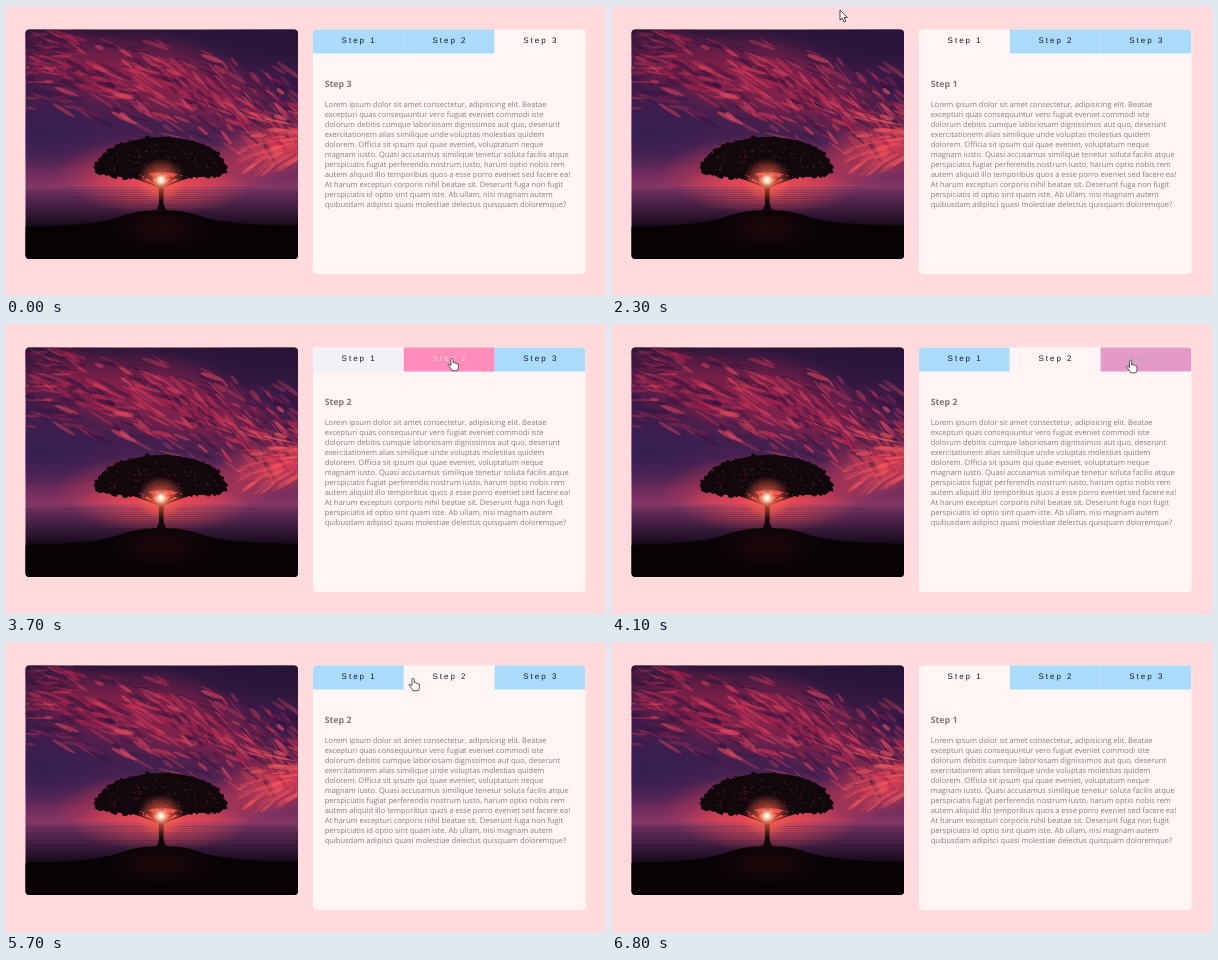
These frames come from a looping animation (600x290 px, 7500 ms). An HTML page with a canvas:

```html
<!DOCTYPE html>
<html lang="en">
<head>
<meta charset="utf-8">
<title>Step tabs</title>
<style>
html, body { margin: 0; width: 100%; height: 100%; overflow: hidden; }
body { position: relative; background: #ffdbdd; }
#stage, #cursor { position: absolute; left: 0; top: 0; }
#panel {
  position: absolute; left: 307px; top: 23px; width: 273px; height: 245px;
  color: #857d7d; text-rendering: geometricPrecision;
}
.tab {
  position: absolute; top: 0; width: 91px; text-align: center;
  font: 8px/24px "Liberation Sans", Arial, sans-serif; letter-spacing: 2px;
}
h1, p { position: absolute; left: 11.7px; margin: 0; white-space: pre; }
h1 { top: 49px; font: bold 8.8px/12px "Open Sans", sans-serif; color: #7f7777; }
p { top: 71px; font: 7.52px/10.03px "Open Sans", sans-serif; }
#cursor { overflow: visible; }
#cursor path { fill: #fff; stroke: #333; stroke-width: .9; stroke-linejoin: round; }
</style>
</head>
<body>
<canvas id="stage" width="600" height="290"></canvas>
<div id="panel">
  <div class="tab" style="left:.7px">Step 1</div>
  <div class="tab" style="left:91.5px">Step 2</div>
  <div class="tab" style="left:182.3px">Step 3</div>
  <h1>Step 3</h1>
  <p>Lorem ipsum dolor sit amet consectetur, adipisicing elit. Beatae
excepturi quas consequuntur vero fugiat eveniet commodi iste
dolorum debitis cumque laboriosam dignissimos aut quo, deserunt
exercitationem alias similique unde voluptas molestias quidem
dolorem. Officia sit ipsum qui quae eveniet, voluptatum neque
magnam iusto. Quasi accusamus similique tenetur soluta facilis atque
perspiciatis fugiat perferendis nostrum iusto, harum optio nobis rem
autem aliquid illo temporibus quos a esse porro eveniet sed facere ea!
At harum excepturi corporis nihil beatae sit. Deserunt fuga non fugit
perspiciatis id optio sint quam iste. Ab ullam, nisi magnam autem
quibusdam adipisci quasi molestiae delectus quisquam doloremque?</p>
</div>
<svg id="cursor" width="16" height="18">
  <path id="arrow" d="M0 0V10.2L2.3 8.1L4 12L5.8 11.2L4.1 7.5H7.3Z"/>
  <path id="hand" transform="translate(0 .6) scale(.92)" d="M-1.2 7.6V.9Q-1.1-.3 0-.3T1.2.9V4.6Q2.6 3.8 3.2 5Q4.5 4.3 5.2 5.6Q7 5.2 7 7V9.4Q7 11 5.8 13.2H0Q-1 11-2.6 9.2L-4.2 7.4Q-4.6 6-3.2 6.2Z"/>
</svg>
<script>
const LOOP = 7500, STEP = 100, FADE = 210;
const PAGE = '#ffdbdd', PANEL = '#fff5f4';
const $ = id => document.getElementById(id);
const c = $('stage').getContext('2d');
const mix = (a, b, k) => a + (b - a) * k;

const looks = {
  idle:   { bg: [170, 219, 251], ink: [25, 25, 35] },
  hover:  { bg: [255, 122, 176], ink: [255, 240, 245] },
  active: { bg: [255, 245, 244], ink: [25, 25, 35] }
};

// [time, look]; entries up to 1200 ms switch without a fade
const tabKeys = [
  [[0, 'idle'], [1200, 'active'], [3670, 'idle'], [5760, 'hover'], [6230, 'active']],
  [[0, 'idle'], [3250, 'hover'], [3670, 'active'], [4580, 'idle'],
   [5060, 'hover'], [5360, 'active'], [6230, 'idle']],
  [[0, 'active'], [1200, 'idle'], [3960, 'hover'], [4580, 'active'], [5360, 'idle']]
];
const titleKeys = [[0, 3], [1200, 1], [3670, 2], [4580, 3], [5360, 2], [6230, 1]];

const path = [
  [1900, 108, 174], [2100, 165, 95], [2300, 228, 4], [2450, 290, 12],
  [2600, 318, 50], [2700, 302, 66], [2900, 325, 76], [3100, 375, 52],
  [3250, 400, 38], [3500, 440, 35], [3700, 446, 34], [3800, 452, 35],
  [3960, 490, 36], [4200, 539, 36], [4800, 539, 36], [5060, 486, 36],
  [5360, 432, 37], [5700, 407, 36], [5760, 397, 36], [6100, 352, 37],
  [6800, 350, 36]
];

const lastIndex = (keys, t) => {
  let i = 0;
  while (i + 1 < keys.length && keys[i + 1][0] <= t) i++;
  return i;
};

function clipRound(x, y, w, h) {
  c.beginPath();
  c.roundRect(x, y, w, h, 4);
  c.clip();
}

function drawPanel(t) {
  c.fillStyle = PAGE;
  c.fillRect(300, 15, 300, 265);
  c.save();
  clipRound(307, 23.5, 272.5, 244.5);
  c.fillStyle = PANEL;
  c.fillRect(300, 15, 300, 265);
  tabs.forEach((el, n) => {
    const keys = tabKeys[n], i = lastIndex(keys, t);
    const [start, name] = keys[i];
    const to = looks[name], from = i ? looks[keys[i - 1][1]] : to;
    const k = start <= 1200 ? 1 : Math.min(1, (t - start) / FADE);
    const blend = part => `rgb(${from[part].map((v, j) => Math.round(mix(v, to[part][j], k)))})`;
    c.fillStyle = blend('bg');
    c.fillRect(307 + n * 90.8, 20, 90.8, 27.5);
    el.style.color = blend('ink');
  });
  c.restore();
  title.textContent = 'Step ' + titleKeys[lastIndex(titleKeys, t)][1];
}

function moveCursor(t) {
  const shown = t >= 1900 && t < 6800;
  $('cursor').style.display = shown ? 'block' : 'none';
  if (!shown) return;
  const i = lastIndex(path, t), a = path[i], b = path[i + 1];
  const k = (t - a[0]) / (b[0] - a[0]);
  const x = mix(a[1], b[1], k), y = mix(a[2], b[2], k);
  const onTab = x > 307 && y > 23 && y < 48;
  $('hand').style.display = onTab ? 'block' : 'none';
  $('arrow').style.display = onTab ? 'none' : 'block';
  $('cursor').style.transform = `translate(${x}px, ${y}px)`;
}

function drawPhoto() {
  let seed = 7;
  const rnd = () => (seed = seed * 16807 % 2147483647) / 2147483647;
  const fade = (g, stops) => {
    stops.forEach(([at, color]) => g.addColorStop(at, color));
    return g;
  };
  const rect = (y, h, stops) => {
    c.fillStyle = fade(c.createLinearGradient(0, y, 0, y + h), stops);
    c.fillRect(19, y, 274, h);
  };
  const blob = (x, y, rx, ry, angle, color) => {
    c.fillStyle = color;
    c.beginPath();
    c.ellipse(x, y, rx, ry, angle, 0, 7);
    c.fill();
  };
  const glow = (x, y, rx, ry, rgb, alpha, angle = 0) => {
    c.save();
    c.translate(x, y);
    c.rotate(angle);
    c.scale(rx, ry);
    c.fillStyle = fade(c.createRadialGradient(0, 0, 0, 0, 0, 1), [
      [0, `rgba(${rgb},${alpha})`], [.5, `rgba(${rgb},${alpha * .55})`], [1, `rgba(${rgb},0)`]
    ]);
    c.fillRect(-1, -1, 2, 2);
    c.restore();
  };
  c.save();
  clipRound(19.5, 23.5, 272.5, 229.5);

  // sky
  rect(23, 158, [[0, '#28153a'], [.3, '#3c1a48'], [.65, '#44204f'],
                 [.85, '#5f2758'], [1, '#853565']]);
  glow(35, 130, 85, 36, '44,30,82', .7);
  glow(90, 65, 110, 42, '165,36,74', .7, .35);
  glow(185, 80, 110, 45, '170,38,76', .75, .4);
  glow(275, 140, 70, 32, '232,66,84', .9, -.2);

  // clouds
  c.filter = 'blur(.7px)';
  for (let i = 0; i < 420; i++) {
    const u = rnd(), x = 20 + 275 * u;
    const y = 55 + 55 * u + (rnd() + rnd() - 1) * 50;
    const angle = .2 + .6 * u + .6 * (rnd() - .5), len = 4 + 11 * rnd(), wide = .7 + 1.8 * rnd();
    const dark = i % 3 === 0, shade = rnd();
    const rgb = dark ? '52,20,62' : [165 + 75 * shade, 32 + 48 * shade, 75 + 25 * shade].map(Math.round);
    blob(x, y, len, wide, angle, `rgba(${rgb},${.25 + .35 * rnd()})`);
  }
  for (let i = 0; i < 45; i++) {
    const x = 235 + 60 * rnd(), y = 105 + 60 * rnd();
    blob(x, y, 6 + 10 * rnd(), .8 + 1.5 * rnd(), .4 - 1.1 * (y - 105) / 60,
         `rgba(250,90,95,${.2 + .35 * rnd()})`);
  }
  c.filter = 'none';
  glow(275, 30, 80, 38, '38,20,55', .9);
  glow(22, 24, 40, 22, '38,20,55', .8);
  glow(155, 172, 110, 42, '235,62,80', .9);

  // sea
  rect(180.5, 73, [[0, '#813866'], [.15, '#602a56'], [.35, '#3a1a3c'], [.52, '#1a0b1d'], [.6, '#070307']]);
  glow(155, 183, 90, 26, '245,80,85', .8);
  for (let y = 184; y < 218; y += 2) {
    c.fillStyle = `rgba(30,12,36,${.1 + .2 * rnd()})`;
    c.fillRect(19, y, 274, 1);
  }

  // hill
  c.fillStyle = '#070305';
  c.beginPath();
  c.moveTo(19, 221);
  c.quadraticCurveTo(92, 220, 116, 210);
  c.bezierCurveTo(138, 202, 174, 202, 194, 210);
  c.quadraticCurveTo(218, 219, 293, 220);
  c.lineTo(293, 254);
  c.lineTo(19, 254);
  c.fill();
  glow(155, 222, 55, 22, '60,12,18', .45);

  // tree
  const bark = '#11070d';
  c.fillStyle = bark;
  c.beginPath();
  c.moveTo(91, 166);
  c.bezierCurveTo(90, 146, 122, 131, 156, 131);
  c.bezierCurveTo(192, 131, 221, 146, 219, 167);
  c.quadraticCurveTo(196, 174, 174, 169);
  c.quadraticCurveTo(156, 163, 138, 169);
  c.quadraticCurveTo(112, 174, 91, 166);
  c.fill();
  for (let i = 0; i < 110; i++) {
    const a = i / 110 * Math.PI * 2, s = Math.sin(a);
    blob(155 + 64 * Math.cos(a), 162 + s * (s < 0 ? 30 : 8) + 3 * rnd(),
         1 + 2.8 * rnd(), .8 + 1.8 * rnd(), rnd(), bark);
  }
  for (let i = 0; i < 90; i++) {
    const a = rnd() * Math.PI, r = Math.sqrt(rnd());
    blob(155 + 60 * r * Math.cos(a), 165 - 29 * r * Math.sin(a),
         .5 + 1.2 * rnd(), .4 + .6 * rnd(), rnd(), 'rgba(105,38,62,.45)');
  }
  c.strokeStyle = bark;
  c.lineWidth = 1.6;
  for (const dx of [-42, -22, 22, 42]) {
    c.beginPath();
    c.moveTo(155, 182);
    c.quadraticCurveTo(155 + dx * .4, 174, 155 + dx, 167);
    c.stroke();
  }
  c.fillStyle = bark;
  c.beginPath();
  c.moveTo(152.5, 160);
  c.lineTo(158, 160);
  c.lineTo(157.5, 198);
  c.lineTo(161, 206);
  c.lineTo(150, 206);
  c.lineTo(153, 198);
  c.fill();

  // sun
  glow(155, 174, 24, 22, '255,100,75', .95);
  glow(155, 174, 9, 9, '255,205,160', 1);
  glow(155, 174, 5, 5, '255,255,250', 1);
  c.restore();
}

const tabs = document.querySelectorAll('.tab');
const title = document.querySelector('h1');

function frame() {
  const t = Math.floor(performance.now() % LOOP / STEP) * STEP;
  drawPanel(t);
  moveCursor(t);
  requestAnimationFrame(frame);
}

drawPhoto();
frame();
</script>
</body>
</html>
```
